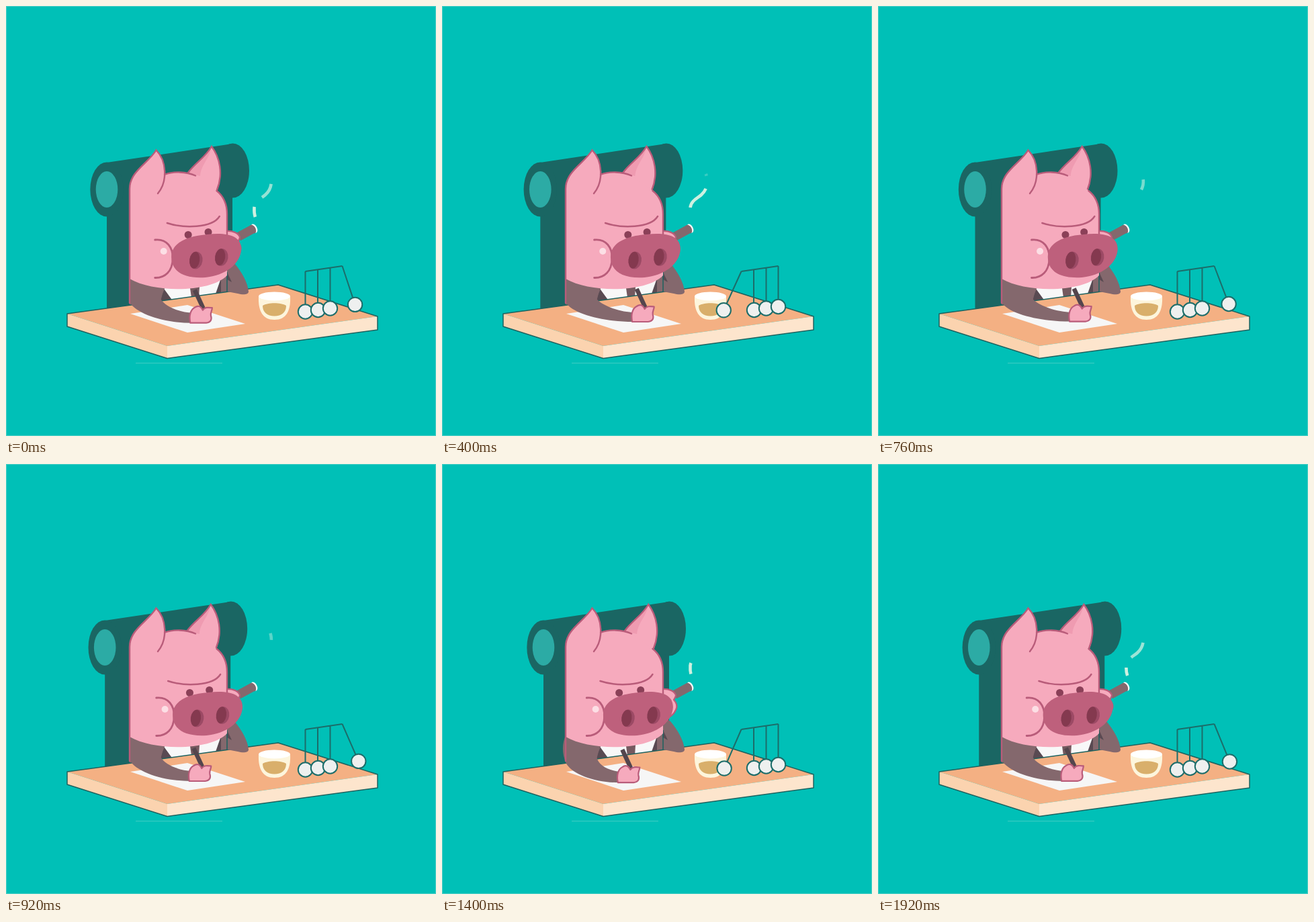
Write an HTML page that moves like this. It is 640 by 640 pixels and loops after 1.96 s.

```html
<!DOCTYPE html>
<html lang="en">
<head>
<meta charset="utf-8">
<title>Pig at a desk</title>
<style>
html, body { margin: 0; height: 100%; overflow: hidden; background: #00c0b7; }
svg { display: block; width: 100vw; height: 100vh; }
.line { fill: none; stroke: #b95c7a; stroke-width: 2.4; stroke-linecap: round; }
.skin { fill: #f6aabd; stroke: #b95c7a; stroke-width: 2.2; stroke-linejoin: round; }
.pink { fill: #f6aabd; }
.suit { fill: #84686d; }
.dark { fill: #594a52; }
.chair { fill: #1a6663; }
.edge { fill: none; stroke: #1c625f; stroke-width: 1.5; stroke-linejoin: round; }
.ball { fill: #eef0ef; stroke: #1c6d6a; stroke-width: 2; }
.wire { fill: none; stroke: #1c6d6a; stroke-width: 2; }
.smoke { fill: none; stroke: #e4f5e4; stroke-width: 4.6; }
</style>
</head>
<body>
<svg viewBox="0 0 640 640">
  <rect width="640" height="640" fill="#00c0b7"/>
  <rect x=".5" y=".5" width="639" height="639" fill="none" stroke="#4fcfc6"/>
  <path d="M193 531.5H322" stroke="#3fcdc3"/>

  <g id="chair">
    <path class="chair" d="M150 233L337 205V460H150Z"/>
    <ellipse class="chair" cx="337.500" cy="245" rx="24.500" ry="40.500"/>
    <ellipse class="chair" cx="150" cy="273" rx="24.700" ry="40.500"/>
    <ellipse cx="150" cy="273" rx="16.300" ry="27" fill="#2caba5"/>
  </g>

  <path class="suit" d="M184 395H329V430L184 448Z"/>
  <path class="dark" d="M236 415L230 440H320V408Z"/>
  <path d="M233 418L249 440L311 431L319 408Z" fill="#f8f8f8"/>
  <path d="M274 420L288 418L287 434H276Z" fill="#75595f"/>

  <path d="M91 458L405 415L553 462L240 506Z" fill="#f4b083"/>
  <path d="M91 458L240 506V524.500L91 477Z" fill="#fbd3af"/>
  <path d="M240 506L553 462V482L240 524.500Z" fill="#fde5cd"/>
  <path class="edge" d="M91 458L405 415L553 462V482L240 524.500L91 477Z"/>
  <path d="M185 458L270 445L356 473L270 486Z" fill="#f6f6f6"/>

  <path class="suit" d="M329 376L340 383C351 396 360 412 361 425C361 430 352 430 345 428L329 425Z"/>
  <path class="dark" d="M329 396L336 411L329 407Z"/>
  <path class="edge" d="M329 396V425" stroke-width="1.200"/>

  <path d="M346 343.500L368 331.500" stroke="#84686d" stroke-width="13"/>
  <ellipse cx="369.500" cy="331" rx="4" ry="7" transform="rotate(-28 369.500 331)" fill="#fff"/>
  <ellipse cx="367.500" cy="332" rx="4" ry="6.800" transform="rotate(-28 367.500 332)" fill="#84686d"/>
  <path class="skin" d="M327 335C338 334 346 338 348 344C348 347 346 349 345 351C349 355 351 361 348 366C345 373 340 378 327 380Z"/>

  <path id="sleeve" class="suit"/>

  <g id="ear">
    <path class="pink" d="M270 249C281 236 296 225 306 209C318 226 324 250 314 276L300 300L262 280Z"/>
    <path d="M271 249C281 237 297 225 305 211C304 226 290 236 289 253Z" fill="#ef9bb1"/>
    <path class="line" d="M271 248C281 234 297 225 306 209C318 225 324 250 313.500 275"/>
  </g>
  <path class="pink" d="M184 406V272C184 246 212 234 223.500 214.500C233 225 238 237 236 251C248 246 270 246 283 253L314 275C325 284 329 296 329 310V401C306 426 222 428 184 406Z"/>
  <path class="line" d="M184 442V272C184 246 212 234 223.500 214.500C239 230 241 261 226 279M236 251C248 246 268 246 282 252.500M313.500 275C325 284 329 296 329 310V342"/>

  <path id="brow" class="line" stroke-width="2" d="M240 323C264 331 307 331 318 313"/>
  <path id="cheek" class="line" style="stroke-width:2.800" d="M222 348C240 346 249 360 248.500 376C248 395 237 405 222 404.500"/>
  <circle id="spot" cx="235" cy="365" r="5" fill="#fcdfe5"/>
  <g fill="#8b4058">
    <circle id="eyeL" cx="271.500" cy="340.500" r="5.500"/>
    <circle id="eyeR" cx="301.300" cy="336.500" r="5.500"/>
  </g>
  <path id="snout" fill="#be607c" d="M246.500 374C246 352 271 342 300 340C328 337 350.500 341 350.500 362C349 385 326 401 297 404C266 406 247 396 246.500 374Z"/>
  <g id="noseL" transform="translate(283 378.500)"><use href="#nostril"/></g>
  <g id="noseR" transform="translate(321 374)"><use href="#nostril"/></g>
  <defs>
    <g id="nostril" transform="rotate(8)">
      <ellipse rx="9.800" ry="13" fill="#9c4a65"/>
      <ellipse cx="-2" rx="7.500" ry="12.500" fill="#84394f"/>
    </g>
  </defs>

  <g id="hand">
    <path d="M279 423L292 451" stroke="#54454d" stroke-width="6.500"/>
    <path class="skin" d="M272.500 472C270 461 273 452 279 449C283 446 288 446 291 453C294 448 300 449 305 449.500C305 454 302 457 303 461C305 467 303 471 296 472Z"/>
  </g>

  <path d="M376 432H423C424 454 417 467 399.500 467C382 467 375 454 376 432Z" fill="#fdf5dc"/>
  <ellipse cx="399.500" cy="432" rx="23.500" ry="6.500" fill="#fff"/>
  <path d="M382 446C390 441 409 441 417 446C417 456 410 461.500 399.500 461.500C389 461.500 382 456 382 446Z" fill="#d9af6b"/>

  <path class="wire" d="M445.500 395L500.500 387M464 392.500V452M482.500 390V450"/>
  <path id="wires" class="wire"/>
  <circle id="ballL" class="ball" r="10.700"/>
  <circle class="ball" cx="464.500" cy="452.500" r="10.700"/>
  <circle class="ball" cx="482.500" cy="450" r="10.700"/>
  <circle id="ballR" class="ball" r="10.700"/>

  <path id="puffA" class="smoke" d="M374.500 321C370 315 369 308 369.500 300C371 289 381 286 386 281C394 274 398 262 392 248"/>
  <path id="puffB" class="smoke" d="M374.500 321C370 315 369 308 369.500 300C371 289 381 286 386 281C394 274 398 262 392 248"/>
</svg>
<script>
const LOOP = 1960, STEP = 40;
const $ = id => document.getElementById(id);
const mod = (a, n) => ((a % n) + n) % n;
const ease = x => (1 - Math.cos(Math.PI * Math.min(1, Math.max(0, x)))) / 2;

// 0 at "from", rising to 1 at "peak", back to 0 at "end"
function sway(t, from, peak, end) {
  const up = mod(peak - from, LOOP), down = mod(end - peak, LOOP);
  const u = mod(t - from, LOOP);
  return u <= up ? ease(u / up) : 1 - ease((u - up) / down);
}

// half a pendulum swing: slows outward, speeds up inward
function swing(u, from, peak, end) {
  if (u <= from || u >= end) return 0;
  const x = (u - peak) / (u < peak ? peak - from : end - peak);
  return 1 - x * x;
}

// face parts: x ratio to the left eye
const parts = { eyeL: 1, eyeR: .72, snout: .84, brow: .58, cheek: .87, spot: .81 };
const noses = { noseL: [283, 378.5, .78], noseR: [321, 374, .75] };

// smoke: time, lower y, upper y, opacity
const puffKeys = [
  [0, 321, 321, 1], [40, 321, 317, .8], [200, 315, 303, .9], [240, 314, 299, .9],
  [480, 305, 283, .9], [640, 300, 272, .9], [800, 288, 266, .68], [840, 285, 265, .65],
  [1160, 262, 252, .4], [1240, 253, 250, .25], [1280, 249, 249, 0]
];

function lengthAt(path, y) {
  let lo = 0, hi = path.getTotalLength();
  for (let i = 0; i < 14; i++) {
    const m = (lo + hi) / 2;
    if (path.getPointAtLength(m).y > y) lo = m; else hi = m;
  }
  return lo;
}

function puff(path, u) {
  const i = puffKeys.findIndex(k => k[0] > u);
  path.style.display = i > 0 && u > 0 ? "" : "none";
  if (i < 1 || u <= 0) return;
  const a = puffKeys[i - 1], b = puffKeys[i];
  const f = (u - a[0]) / (b[0] - a[0]);
  const [, low, high, alpha] = a.map((v, n) => v + (b[n] - v) * f);
  const s = lengthAt(path, low), e = lengthAt(path, high);
  path.setAttribute("stroke-dasharray", `0 ${s} ${e - s} 999`);
  path.setAttribute("opacity", alpha);
}

const shift = (id, x, y = 0) => $(id).setAttribute("transform", `translate(${x} ${y})`);

function setBall(id, x, y) {
  $(id).setAttribute("cx", x);
  $(id).setAttribute("cy", y);
}

function cradle(t) {
  const u = mod(t, LOOP / 2);
  const l = 27 * swing(u, 104, 358, 612);
  // the right swing runs across the end of the half loop
  const r = 25.8 * swing(u < 200 ? u + LOOP / 2 : u, 605, 865, 1090);
  const lx = 445.5 - l, ly = 395 + Math.sqrt(3600 - l * l) + .146 * l;
  const rx = 500.5 + r, ry = 387 + Math.sqrt(3660 - r * r);
  setBall("ballL", lx, ly);
  setBall("ballR", rx, ry);
  $("wires").setAttribute("d", `M445.5 395L${lx} ${ly}M500.5 387L${rx} ${ry}`);
}

function arm(t) {
  const p = sway(t, 1120, 720, 1120);
  const dx = 26 * p - 12.7, dy = 2.5 - 5 * p;
  const b = 6 * Math.max(0, 1 - 2.4 * p);
  shift("hand", dx, dy);
  $("sleeve").setAttribute("d",
    `M184 404C${184 - b} 415 ${184 - 1.3 * b} 430 ${184 + b * .2} ${441 + b}` +
    `C195 ${459 + b * .7} ${235 + dx * .6} ${472 + dy} ${274 + dx} ${472 + dy}` +
    `L${276 + dx} ${457 + dy * .5}C${257 + dx} 456 ${237 + dx * .4} 448 230 436L237 418Z`);
}

function draw(t) {
  const face = 16.5 * sway(t, 1120, 790, 1120) - 9;
  for (const id in parts) shift(id, face * parts[id]);
  for (const id in noses) {
    const [x, y, k] = noses[id];
    shift(id, x + face * k, y);
  }
  const back = 1 - 6.5 * sway(t, 1700, 760, 1120);
  shift("chair", back);
  shift("ear", back * (back > 0 ? 1.2 : .42));
  arm(t);
  cradle(t);
  puff($("puffA"), mod(t - 1120, LOOP));
  puff($("puffB"), mod(t - 1720, LOOP));
}

const start = performance.now();
function tick() {
  const t = mod(performance.now() - start, LOOP);
  draw(Math.floor(t / STEP) * STEP);
  requestAnimationFrame(tick);
}
tick();
</script>
</body>
</html>
```
